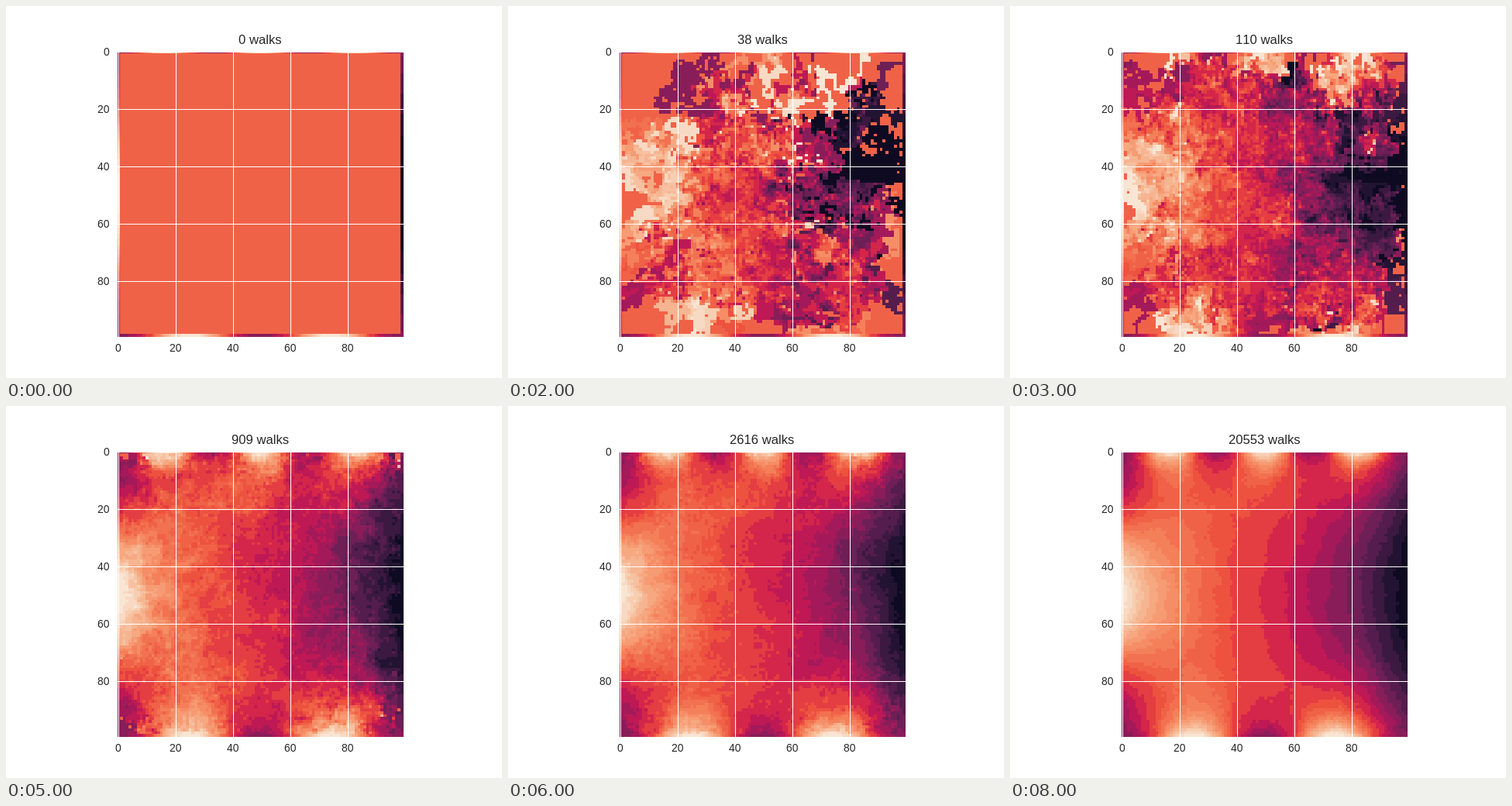
An HTML page with a canvas that plays this animation: 640x480 px, repeating every 9 s.

```html
<!DOCTYPE html>
<html lang="en">
<head>
<meta charset="utf-8">
<title>Random walks</title>
<style>
  html, body { margin: 0; width: 100%; height: 100%; overflow: hidden; background: #fff; }
  canvas, svg { position: absolute; left: 0; top: 0; }
  text {
    font: 13.89px "Liberation Sans", Arial, sans-serif;
    font-kerning: none;
    fill: #262626;
  }
  #title { font-size: 16.67px; }
</style>
</head>
<body>
<canvas id="plot" width="640" height="480"></canvas>
<svg id="labels" width="640" height="480"><text id="title"></text></svg>
<script>
const N = 100, CELL = 3.696, LEFT = 143.2, TOP = 57.5;
const AREA = { x: 144, y: 60, w: 369, h: 367 };
const COUNTS = [0, 13, 38, 110, 316, 909, 2616, 7524, 20553];
const HOLD = 1000;

const STOPS = ["03051a", "221331", "451c47", "691f55", "921c5b", "b91657",
  "d92847", "ed503e", "f47d57", "f6a47c", "f7c9aa", "faebdd"]
  .map(hex => [0, 2, 4].map(i => parseInt(hex.slice(i, i + 2), 16)));

// Colour bands are narrower in the light part of the scale
function colour(v) {
  const n = v < 0.625 ? 16 : 32;
  const p = (Math.min(Math.floor(v * n), n - 1) + 0.5) / n * (STOPS.length - 1);
  const i = Math.floor(p);
  return STOPS[i].map((c, k) => Math.round(c + (STOPS[i + 1][k] - c) * (p - i)));
}

// Fixed values on the four edges, zero inside
const edge = new Float64Array(N * N), inner = new Uint8Array(N * N).fill(1);
function setEdge(x, y, v) {
  edge[y * N + x] = v;
  inner[y * N + x] = 0;
}
for (let i = 0; i < N; i++) {
  const t = i / (N - 1) * Math.PI;
  setEdge(i, 0, -Math.cos(6 * t));
  setEdge(i, N - 1, -Math.cos(4 * t));
  setEdge(0, i, -Math.cos(2 * t));
  setEdge(N - 1, i, -1 - Math.sin(t));
}

let seed = 90210317;
function next() {
  seed ^= seed << 13;
  seed ^= seed >>> 17;
  seed ^= seed << 5;
  return seed >>> 0;
}

const sum = new Float64Array(N * N), hits = new Int32Array(N * N);
const stamp = new Int32Array(N * N), path = new Int16Array(N * N);
const STEP = new Int32Array([1, -1, N, -N]);

// Starts are spread evenly, from the middle outwards for the first walks
function startOf(k) {
  const reach = Math.min(49, 26 + k / 4);
  const along = ratio => Math.floor(50 + reach * (2 * ((0.5 + k * ratio) % 1) - 1));
  return along(0.56984) * N + along(0.75488);
}

// Every cell on the way learns the value of the edge the walk ends on
function addWalk(k) {
  let p = startOf(k), length = 0;
  while (inner[p]) {
    if (stamp[p] !== k + 1) {
      stamp[p] = k + 1;
      path[length++] = p;
    }
    p += STEP[next() >>> 30];
  }
  for (let i = 0; i < length; i++) {
    sum[path[i]] += edge[p];
    hits[path[i]]++;
  }
}

// Values run from -2 to 1
const shade = () => Array.from(edge, (e, p) =>
  colour(((hits[p] ? sum[p] / hits[p] : e) + 2) / 3));

let done = 0;
const stages = COUNTS.map(count => {
  while (done < count) addWalk(done++);
  return shade();
});

const ctx = document.getElementById("plot").getContext("2d");
const labels = document.getElementById("labels");
const title = document.getElementById("title");
const image = ctx.createImageData(AREA.w, AREA.h);
const cellAt = (px, origin) => Math.min(N - 1, Math.floor((px + 0.5 - origin) / CELL));
const tickX = v => Math.round(145.05 + v * CELL);
const tickY = v => Math.round(59.45 + v * CELL);

// Sets text on whole pixels; align is 0.5 for centred, 1 for right
function write(el, value, x, y, align) {
  el.textContent = value;
  el.setAttribute("x", Math.round(x - el.getComputedTextLength() * align));
  el.setAttribute("y", y);
}

function paint(stage) {
  const field = stages[stage];
  let o = 0;
  for (let y = 0; y < AREA.h; y++) {
    const row = cellAt(AREA.y + y, TOP) * N;
    for (let x = 0; x < AREA.w; x++, o += 4) {
      const [r, g, b] = field[row + cellAt(AREA.x + x, LEFT)];
      image.data[o] = r;
      image.data[o + 1] = g;
      image.data[o + 2] = b;
      image.data[o + 3] = 255;
    }
  }
  ctx.putImageData(image, AREA.x, AREA.y);
  ctx.fillStyle = "#fff";
  for (let v = 0; v < N; v += 20) {
    ctx.fillRect(tickX(v), AREA.y, 1, AREA.h);
    ctx.fillRect(AREA.x, tickY(v), AREA.w, 1);
  }
  write(title, COUNTS[stage] + " walks", 328, 49, 0.5);
}

function addLabel(...place) {
  const el = document.createElementNS("http://www.w3.org/2000/svg", "text");
  labels.append(el);
  write(el, ...place);
}
for (let v = 0; v < N; v += 20) {
  addLabel(v, 145.05 + v * CELL, 446, 0.5);
  addLabel(v, 133.5, tickY(v) + 5, 1);
}

const start = performance.now();
let shown = -1;
function frame() {
  const time = Math.max(0, performance.now() - start);
  const stage = Math.floor(time / HOLD) % COUNTS.length;
  if (stage !== shown) paint(shown = stage);
  requestAnimationFrame(frame);
}
frame();
</script>
</body>
</html>
```
